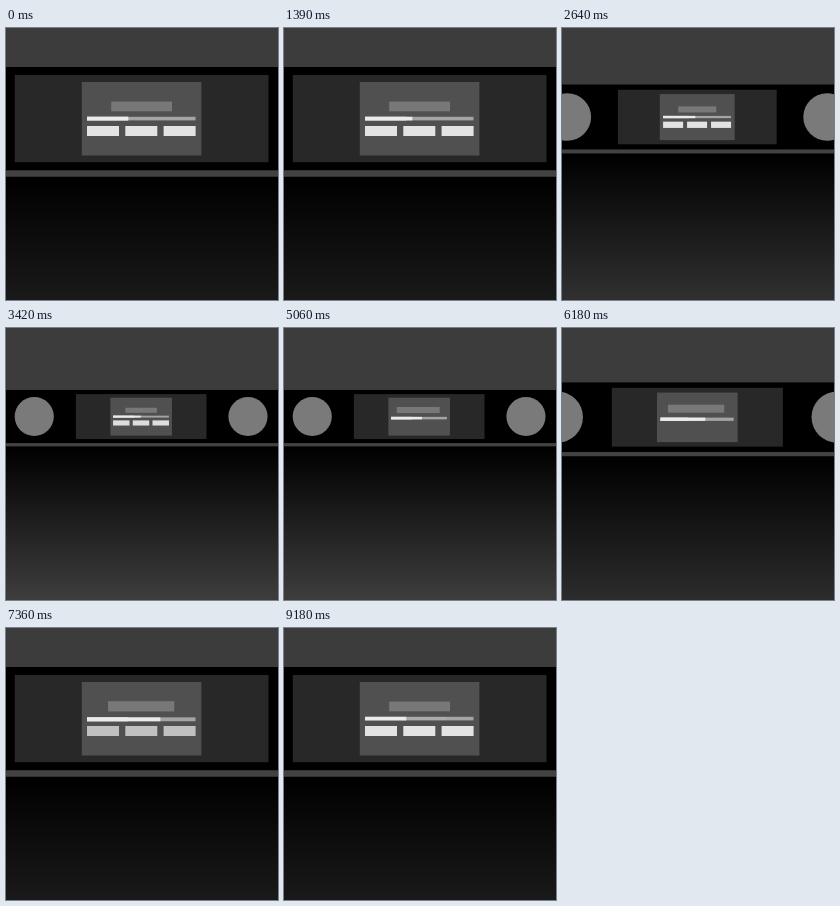
These frames come from a looping animation (272x272 px, 9.27 s). An HTML page with a canvas:

```html
<!DOCTYPE html>
<html lang="en">
<head>
<meta charset="utf-8">
<title>Player zoom</title>
<style>
  html, body { margin: 0; width: 100%; height: 100%; overflow: hidden; background: #000; }
  canvas { display: block; }
</style>
</head>
<body>
<canvas id="stage" width="272" height="272"></canvas>
<script>
const LOOP = 9270;
const SMALL = 0.515;
const FOCUS = { x: 134.7, y: 86.4 };
const BAR = { left: 81, width: 108.5 };
// Playback position over time: [ms, fraction]
const PLAYBACK = [[0, .38], [1390, .437], [2180, .462], [2640, .475], [4030, .512],
  [5060, .553], [6180, .612], [7360, .676], [LOOP, .76]];

const ctx = document.getElementById('stage').getContext('2d');

const mix = (a, b, k) => a + (b - a) * k;
const easeInOut = u => u < .5 ? 2 * u * u : 1 - 2 * (1 - u) * (1 - u);
const ramp = (t, start, length) => Math.min(1, Math.max(0, (t - start) / length));
const eased = (t, start, length) => easeInOut(ramp(t, start, length));

function box(color, left, top, right, bottom) {
  ctx.fillStyle = color;
  ctx.fillRect(left, top, right - left, bottom - top);
}

function disc(color, x, y, radius) {
  ctx.fillStyle = color;
  ctx.beginPath();
  ctx.arc(x, y, radius, 0, 2 * Math.PI);
  ctx.fill();
}

function playback(t) {
  const i = PLAYBACK.findIndex(([time]) => time > t);
  const [t0, p0] = PLAYBACK[i - 1];
  const [t1, p1] = PLAYBACK[i];
  return mix(p0, p1, (t - t0) / (t1 - t0));
}

const ground = ctx.createLinearGradient(0, 149, 0, 440);
ground.addColorStop(0, '#000');
ground.addColorStop(1, '#3c3c3c');

function drawRoom() {
  box('#3c3c3c', -300, -300, 600, 39);
  box('#000', -300, 39, 600, 142.4);
  box('#424242', -300, 142.4, 600, 148.8);
  box(ground, -300, 148.8, 600, 600);
  disc('#7a7a7a', -72, 90.5, 38);
  disc('#7a7a7a', 343, 90.5, 38);
}

function drawPlayer(t, compact) {
  box('#282828', 8.8, 47, 262.5, 134.2);
  box('#505050', 75.8, 54, 195.4, 127.5);
  box('#787878', mix(105.2, 92, compact), mix(73.6, 72, compact),
    mix(166, 175.5, compact), mix(83.3, 83.8, compact));

  const top = mix(88.8, 91.2, compact);
  const bottom = mix(92.4, 96, compact);
  const fill = (color, part) => box(color, BAR.left, top, BAR.left + BAR.width * part, bottom);
  fill('#a4a4a4', 1);
  // The old position fades out while the first one stays, closing the loop.
  ctx.globalAlpha = 1 - ramp(t, LOOP - 1000, 1000);
  fill('#ebebeb', playback(t));
  ctx.globalAlpha = 1;
  fill('#ebebeb', PLAYBACK[0][1]);

  ctx.globalAlpha = 1 - compact;
  for (let i = 0; i < 3; i++) {
    const left = BAR.left + i * 38.3;
    box('#e3e3e3', left, 98, left + 32, 108);
  }
  ctx.globalAlpha = 1;
}

function draw(now) {
  const t = now % LOOP;
  const away = eased(t, 1880, 1150) - eased(t, 5715, 1150);
  const compact = eased(t, 3360, 540) - eased(t, 7020, 520);
  const scale = mix(1, SMALL, away);
  ctx.setTransform(scale, 0, 0, scale, FOCUS.x * (1 - scale), FOCUS.y * (1 - scale));
  drawRoom();
  drawPlayer(t, compact);
}

const start = performance.now();
function tick() {
  draw(performance.now() - start);
  requestAnimationFrame(tick);
}
tick();
</script>
</body>
</html>
```
